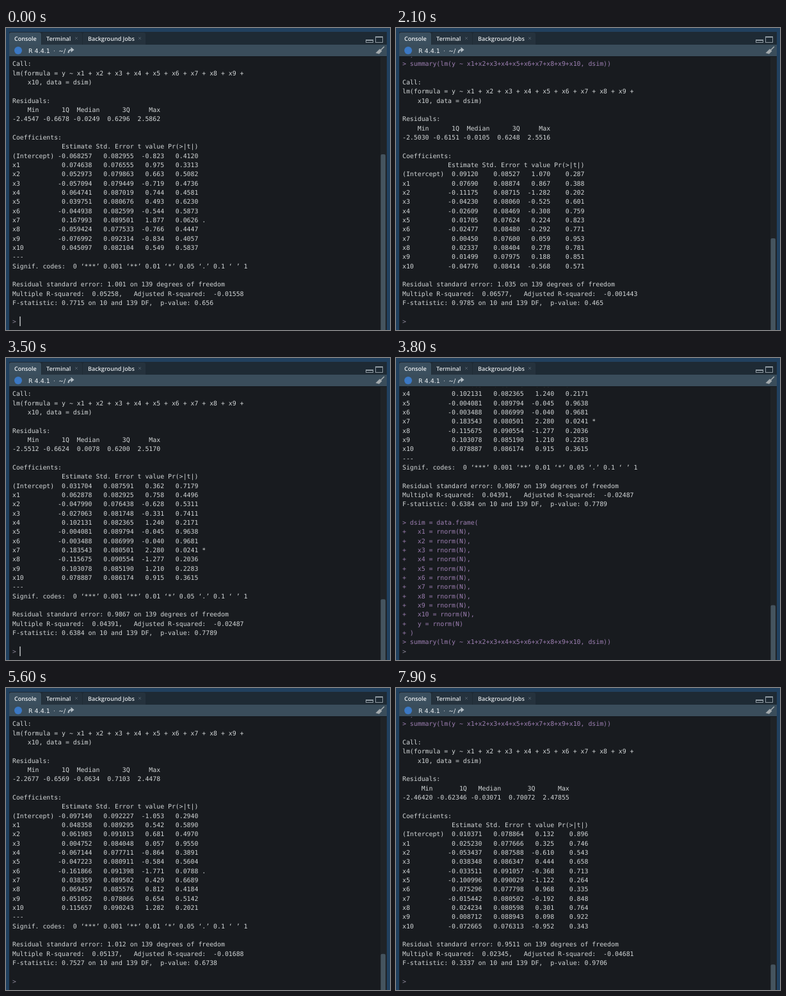
These frames come from a looping animation (600x471 px, 8000 ms). An HTML page with a canvas:

```html
<!DOCTYPE html>
<html lang="en">
<head>
<meta charset="utf-8">
<title>Console</title>
<style>
html, body { margin: 0; width: 100%; height: 100%; overflow: hidden; background: #181b1f; }
canvas { display: block; width: 600px; height: 471px; }
</style>
</head>
<body>
<canvas id="stage" width="600" height="471"></canvas>
<script>
const ctx = document.getElementById('stage').getContext('2d');
const LOOP = 8000, STEP = 100;
const LINE = 14.34, LEFT = 10, FIRST_BASE = 59.2, LAST_ROW = 28;
const VIEW = { top: 45, trackTop: 49, height: 424 };
const MONO = '9.85px "DejaVu Sans Mono", monospace';
const COLOR = {
  frame: '#21405e', tabs: '#1e2a34', active: '#3b4f5e', bar: '#3a4d5b',
  body: '#181b1f', track: '#1f2327', thumb: '#45545f',
  text: '#d3d7d8', input: '#9d7fb2', prompt: '#8d8799'
};

// Each run simulates a noise regression; `strong` fixes the t value of notable terms.
const RUNS = [
  { start: 0, rse: 1.001, r2: 0.052584, digits: 6, resDigits: 4, strong: { x7: 1.877 } },
  { start: 1200, rse: 1.035, r2: 0.065768, digits: 5, resDigits: 4, strong: {} },
  { start: 2400, rse: 0.9867, r2: 0.04391, digits: 6, resDigits: 4, strong: { x7: 2.28 } },
  { start: 3700, rse: 1.008, r2: 0.08374, digits: 6, resDigits: 5, strong: { x1: 2.131, x3: -1.709, x5: 1.744 } },
  { start: 5000, rse: 1.012, r2: 0.05137, digits: 6, resDigits: 4, strong: { x6: -1.771 } },
  { start: 5900, rse: 1.031, r2: 0.08616, digits: 5, resDigits: 4, strong: { x1: 2.222 } },
  { start: 7200, rse: 0.9511, r2: 0.023446, digits: 6, resDigits: 5, strong: {} }
];

const TERMS = 10, DF = 139;
const VARS = Array.from({ length: TERMS }, (_, i) => 'x' + (i + 1));
const CODE = [
  '> dsim = data.frame(',
  ...VARS.map(v => `+   ${v} = rnorm(N),`),
  '+   y = rnorm(N)',
  '+ )',
  `> summary(lm(y ~ ${VARS.join('+')}, dsim))`
];

function randomFrom(seed) {
  let state = seed;
  return () => (state = (state * 48271) % 2147483647) / 2147483647;
}

// Two-sided p value: Simpson integration of the t density.
function tProbability(t) {
  const n = 40, h = Math.abs(t) / n;
  const peak = (1 - 1 / (4 * DF)) / Math.sqrt(2 * Math.PI);
  let sum = 0;
  for (let i = 0; i <= n; i++) {
    const weight = i === 0 || i === n ? 1 : i % 2 ? 4 : 2;
    sum += weight * peak * (1 + (i * h) ** 2 / DF) ** (-(DF + 1) / 2);
  }
  return 1 - 2 * sum * h / 3;
}

// Upper tail of the F statistic as a finite sum, as TERMS is even.
function fProbability(r2) {
  let term = 1, sum = 0;
  for (let j = 0; j < TERMS / 2; j++) {
    sum += term;
    term *= (DF / 2 + j) / (j + 1) * r2;
  }
  return (1 - r2) ** (DF / 2) * sum;
}

const signif = value => String(Number(value.toPrecision(4)));
const widest = words => Math.max(...words.map(w => w.length));
const padRow = (words, widths) => words.map((w, i) => w.padStart(widths[i])).join(' ');

function summaryLines(run, index) {
  const random = randomFrom(7919 * (index + 3));
  const residuals = [-2.4, -0.64, -0.02, 0.66, 2.4]
    .map(q => (q * (0.9 + 0.2 * random()) + 0.1 * (random() - 0.5)).toFixed(run.resDigits));
  const hasMarks = Object.keys(run.strong).length > 0;
  const names = ['(Intercept)', ...VARS];
  const rows = names.map(name => {
    const error = 0.076 + 0.018 * random();
    const chance = 2.6 * (random() - 0.5);
    const t = run.strong[name] ?? chance;
    const p = tProbability(t);
    return [
      (t * error).toFixed(run.digits), error.toFixed(run.digits), t.toFixed(3),
      p.toFixed(hasMarks ? 4 : 3), p < 0.05 ? '*' : p < 0.1 ? '.' : ''
    ];
  });
  const resWidths = residuals.map(() => widest(residuals));
  const widths = [Math.max(8, widest(rows.map(r => r[0]))), 10, 7, 8, 1];
  const legend = ['---', 'Signif. codes:  0 ‘***’ 0.001 ‘**’ 0.01 ‘*’ 0.05 ‘.’ 0.1 ‘ ’ 1'];
  const adjusted = 1 - (1 - run.r2) * (DF + TERMS) / DF;
  const f = run.r2 / TERMS / ((1 - run.r2) / DF);
  return [
    '', 'Call:',
    `lm(formula = y ~ ${VARS.slice(0, 9).join(' + ')} + `,
    '    x10, data = dsim)',
    '', 'Residuals:',
    padRow(['Min', '1Q', 'Median', '3Q', 'Max'], resWidths),
    padRow(residuals, resWidths),
    '', 'Coefficients:',
    ' '.repeat(12) + padRow(['Estimate', 'Std. Error', 't value', 'Pr(>|t|)'], widths),
    ...rows.map((row, i) => names[i].padEnd(12) + padRow(row, widths)),
    ...(hasMarks ? legend : []), '',
    `Residual standard error: ${run.rse} on ${DF} degrees of freedom`,
    `Multiple R-squared:  ${signif(run.r2)},`.padEnd(32) + `Adjusted R-squared:  ${signif(adjusted)}`,
    `F-statistic: ${signif(f).padStart(5)} on ${TERMS} and ${DF} DF,  p-value: ${signif(fProbability(run.r2))}`,
    ''
  ];
}

const log = [''];
RUNS.forEach((run, index) => {
  run.before = log.length;
  log.push(...CODE, ...summaryLines(run, index));
  run.after = log.length;
});

function rect(color, x, y, w, h) {
  ctx.fillStyle = color;
  ctx.fillRect(x, y, w, h);
}

function roundRect(color, x, y, w, h, radius) {
  ctx.fillStyle = color;
  ctx.beginPath();
  ctx.roundRect(x, y, w, h, radius);
  ctx.fill();
}

function label(text, x, y, font, color) {
  ctx.font = font;
  ctx.fillStyle = color;
  ctx.fillText(text, x, y);
}

function stroke(color, width, points) {
  ctx.strokeStyle = color;
  ctx.lineWidth = width;
  ctx.beginPath();
  points.forEach(([x, y]) => ctx.lineTo(x, y));
  ctx.stroke();
}

function fillShape(color, points) {
  ctx.fillStyle = color;
  ctx.beginPath();
  points.forEach(([x, y]) => ctx.lineTo(x, y));
  ctx.fill();
}

function drawTab(text, x, left, right, active) {
  roundRect(active ? COLOR.active : '#25323d', left, 7, right - left, 19, [3, 3, 0, 0]);
  label(text, x, 19.6, '600 9.05px "Open Sans", sans-serif', active ? '#f0f2f4' : '#e2e6e9');
  if (!active) {
    const cx = right - 9;
    stroke('#4d5a65', 1, [[cx - 2, 14], [cx + 2, 18]]);
    stroke('#4d5a65', 1, [[cx + 2, 14], [cx - 2, 18]]);
  }
}

function drawWindowIcon(x, y, height) {
  rect('#8f9aa2', x, y, 12, height);
  rect(COLOR.tabs, x + 1, y + 2, 10, height - 3);
}

function drawChrome() {
  rect(COLOR.frame, 0, 0, 600, 26);
  rect(COLOR.tabs, 5, 6, 590, 20);
  drawTab('Console', 13, 5, 55, true);
  drawTab('Terminal', 63, 56, 119, false);
  drawTab('Background Jobs', 128, 120, 218, false);
  drawWindowIcon(562, 18, 5);
  drawWindowIcon(577, 13, 10);

  rect(COLOR.bar, 5, 26, 590, 18);
  rect('#14191e', 5, 44, 590, 1);
  ctx.fillStyle = '#3b78c4';
  ctx.beginPath();
  ctx.arc(19, 35, 6, 0, Math.PI * 2);
  ctx.fill();
  const font = '9.5px "DejaVu Sans", sans-serif';
  label('R 4.4.1', 35, 38.5, font, '#eef1f3');
  label('·', 74, 38.5, font, '#b7c1c9');
  label('~/', 82, 38.5, font, '#eef1f3');

  ctx.strokeStyle = '#b4bec5';
  ctx.lineWidth = 2;
  ctx.beginPath();
  ctx.moveTo(97.5, 39);
  ctx.quadraticCurveTo(97.5, 34, 102, 34);
  ctx.stroke();
  fillShape('#b4bec5', [[101.5, 30], [106.5, 34], [101.5, 38]]);

  stroke('#a9b0b4', 1.5, [[591, 29], [585.5, 34.5]]);
  fillShape('#a3aaad', [[584, 32.5], [587.5, 36], [583, 40.5], [577.5, 39]]);

  rect(COLOR.frame, 0, 26, 5, 445);
  rect(COLOR.frame, 595, 26, 5, 445);
}

// A run pastes its code, scrolls to it, then prints the summary.
function viewAt(time) {
  const run = RUNS.filter(r => r.start <= time).pop();
  const age = time - run.start;
  const pasted = run.before + CODE.length;
  if (run !== RUNS[0] && age < STEP) {
    return { count: pasted, bottom: run.before, shift: 13.3, age };
  }
  if (run !== RUNS[0] && age < 2 * STEP) {
    return { count: pasted, bottom: pasted, shift: 0, age };
  }
  return { count: run.after, bottom: run.after, shift: 0, age, idle: true };
}

function drawConsole({ count, bottom, shift, age, idle }) {
  rect(COLOR.body, 5, VIEW.top, 590, 471 - VIEW.top);
  const baseline = i => FIRST_BASE + (i - bottom + LAST_ROW) * LINE - shift;
  const first = Math.max(0, bottom - LAST_ROW - 1);

  ctx.save();
  ctx.beginPath();
  ctx.rect(5, VIEW.top, 580, 471 - VIEW.top);
  ctx.clip();
  for (let i = first; i < count && baseline(i) < 485; i++) {
    label(log[i], LEFT, baseline(i), MONO, /^[>+]/.test(log[i]) ? COLOR.input : COLOR.text);
  }
  label('>', LEFT, baseline(count), MONO, COLOR.prompt);
  if (idle && age % 1000 < 500) rect('#d5d8da', 21.4, baseline(count) - 10.8, 1.3, 15);
  ctx.restore();

  const height = n => (n + 1) * LINE + 6;
  const scale = VIEW.height / height(count);
  const offset = height(bottom) - VIEW.height + shift;
  rect(COLOR.track, 585, VIEW.top, 10, 471 - VIEW.top);
  roundRect(COLOR.thumb, 585.5, VIEW.trackTop + offset * scale, 7.5, VIEW.height * scale, 2);
}

function draw(now) {
  const time = Math.floor((now % LOOP) / STEP) * STEP;
  ctx.textRendering = 'geometricPrecision';
  drawConsole(viewAt(time));
  drawChrome();
  requestAnimationFrame(draw);
}
requestAnimationFrame(draw);
</script>
</body>
</html>
```
